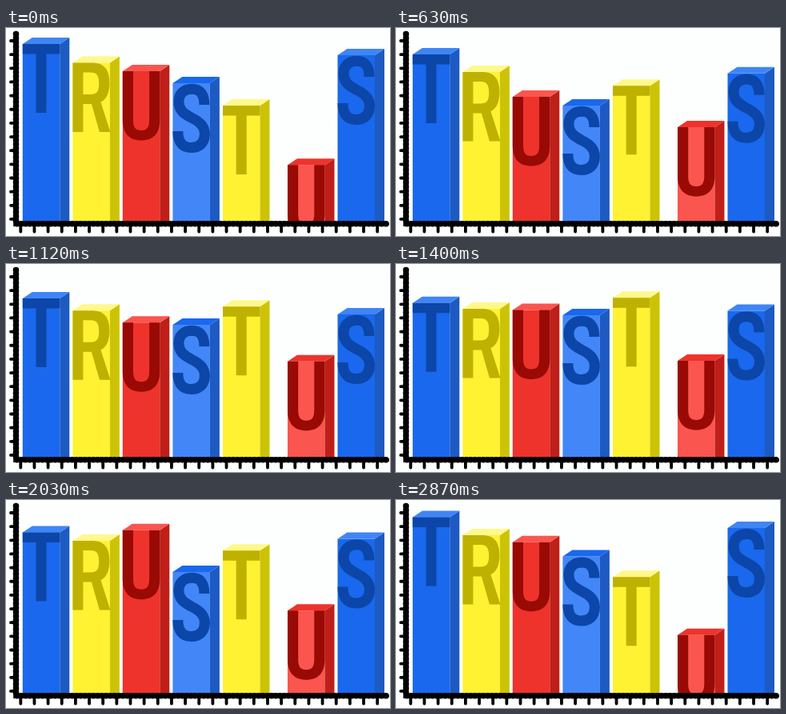
An HTML page for the animation above (2.94 s loop, 480 by 260 pixels).

```html
<!DOCTYPE html>
<html lang="en">
<head>
<meta charset="utf-8">
<title>Trust us</title>
<style>
html, body { margin: 0; width: 100%; height: 100%; overflow: hidden; background: #fdfffe; }
svg { display: block; width: 100%; height: 100%; }
</style>
</head>
<body>
<svg id="chart" viewBox="0 0 480 260" role="img" aria-label="TRUST US">
  <clipPath id="plot"><rect width="480" height="243"/></clipPath>
  <g id="bars" clip-path="url(#plot)"></g>
  <g id="axes" fill="none" stroke="#000" stroke-linecap="round"></g>
</svg>
<script>
const LOOP = 2940, STEP = 70, BASE = 243;
const WIDTH = 46.5, DEPTH = 12, RISE = 8;

const GLYPHS = {
  T: "M0 0H46.5V12.5H29.7V86H16.7V12.5H0Z",
  R: "M0 0H24C39 0 46 8 46 25C46 38 42 46 35 49L47 86.5H33.5L23.5 51.5H13V86.5H0ZM13 12V39.5H22.5C30 39.5 32.8 36 32.8 26C32.8 16 30 12 22.5 12Z",
  U: "M0 0H13.2V61C13.2 70 16 74 23.3 74S33.3 70 33.3 61V0H46.5V61C46.5 78 38 86.5 23.3 86.5S0 78 0 61Z",
  S: "M39.5 27C39.5 13.5 34 7.3 24 7.3C13 7.3 7.5 14 7.5 23C7.5 34 14 38 23 43C33 48 40 53 40 63.5C40 74.5 33.5 80.5 23.5 80.5C12 80.5 6.5 73.5 6.5 60"
};

// front, lid, side, letter
const BLUE = ["#1968ee", "#3f85f6", "#1d5ac2", "#0c46a8"];
const SKY = ["#4286f8", "#1968ee", "#1d5ac2", "#0c46a8"];
const YELLOW = ["#fff233", "#fff88a", "#cdc306", "#beb100"];
const RED = ["#ee332c", "#fa554e", "#bf1f18", "#990a05"];
const CORAL = ["#fa554e", "#ee332c", "#bf1f18", "#990a05"];

// keys: [time, top of the front face]
const BARS = [
  { x: 20.8, char: "T", tint: BLUE, keys: [[0, 20], [1540, 51.5], [LOOP, 20]] },
  { x: 83.4, char: "R", tint: YELLOW, keys: [[0, 43.5], [910, 60], [LOOP, 43.5]] },
  { x: 145.8, char: "U", tint: RED, keys: [[0, 54], [770, 93], [1820, 34], [LOOP, 54]] },
  { x: 208.4, char: "S", tint: SKY, keys: [[0, 69], [630, 97], [1470, 61], [2000, 90.7], [LOOP, 69]] },
  { x: 271, char: "T", tint: YELLOW, keys: [[0, 97], [1450, 40.3], [2890, 97], [LOOP, 97]] },
  { x: 352, char: "U", tint: CORAL, keys: [[0, 171.3], [640, 123.3], [1540, 120.5], [LOOP, 171.3]] },
  { x: 414.5, char: "S", tint: BLUE, keys: [[0, 34], [900, 66.5], [LOOP, 34]] }
];

function add(parent, tag, attrs) {
  const el = document.createElementNS("http://www.w3.org/2000/svg", tag);
  for (const name in attrs) el.setAttribute(name, attrs[name]);
  return parent.appendChild(el);
}

function buildBar({ x, char, tint, keys }) {
  const [front, lid, side, ink] = tint;
  const g = add(document.getElementById("bars"), "g", {});
  add(g, "path", { d: `M0 0H${WIDTH}V${BASE}H0Z`, fill: front });
  add(g, "path", { d: `M${WIDTH} 0l${DEPTH} ${-RISE}V${BASE}H${WIDTH}Z`, fill: side });
  add(g, "path", { d: `M0 0L${DEPTH} ${-RISE}h${WIDTH}L${WIDTH} 0Z`, fill: lid });
  add(g, "path", char === "S"
    ? { d: GLYPHS.S, fill: "none", stroke: ink, "stroke-width": 13 }
    : { d: GLYPHS[char], fill: ink, "fill-rule": "evenodd" });
  return { g, x, keys };
}

function buildAxes() {
  const axes = document.getElementById("axes");
  const frame = "M12.5 7.5V244.7H475.5";
  let ticks = "";
  for (let i = 0; i < 14; i++) ticks += `M6 ${16 + i * 17.15}H12`;
  for (let i = 0; i < 27; i++) ticks += `M${18.3 + i * 17.15} 246V254.5`;
  add(axes, "path", { d: frame, "stroke-width": 6.6 });
  add(axes, "path", { d: frame, "stroke-width": 7.6, "stroke-dasharray": "0 5.3" });
  add(axes, "path", { d: ticks, "stroke-width": 3.8 });
}

function valueAt(keys, t) {
  const i = keys.findIndex(key => key[0] > t);
  const [t0, y0] = keys[i - 1], [t1, y1] = keys[i];
  return y0 + (y1 - y0) * (t - t0) / (t1 - t0);
}

const bars = BARS.map(buildBar);
buildAxes();

function draw(ms) {
  const t = Math.floor((ms % LOOP) / STEP) * STEP;
  for (const { g, x, keys } of bars)
    g.setAttribute("transform", `translate(${x} ${valueAt(keys, t).toFixed(2)})`);
}

const start = performance.now();
function tick() {
  draw(performance.now() - start);
  requestAnimationFrame(tick);
}
tick();
</script>
</body>
</html>
```
